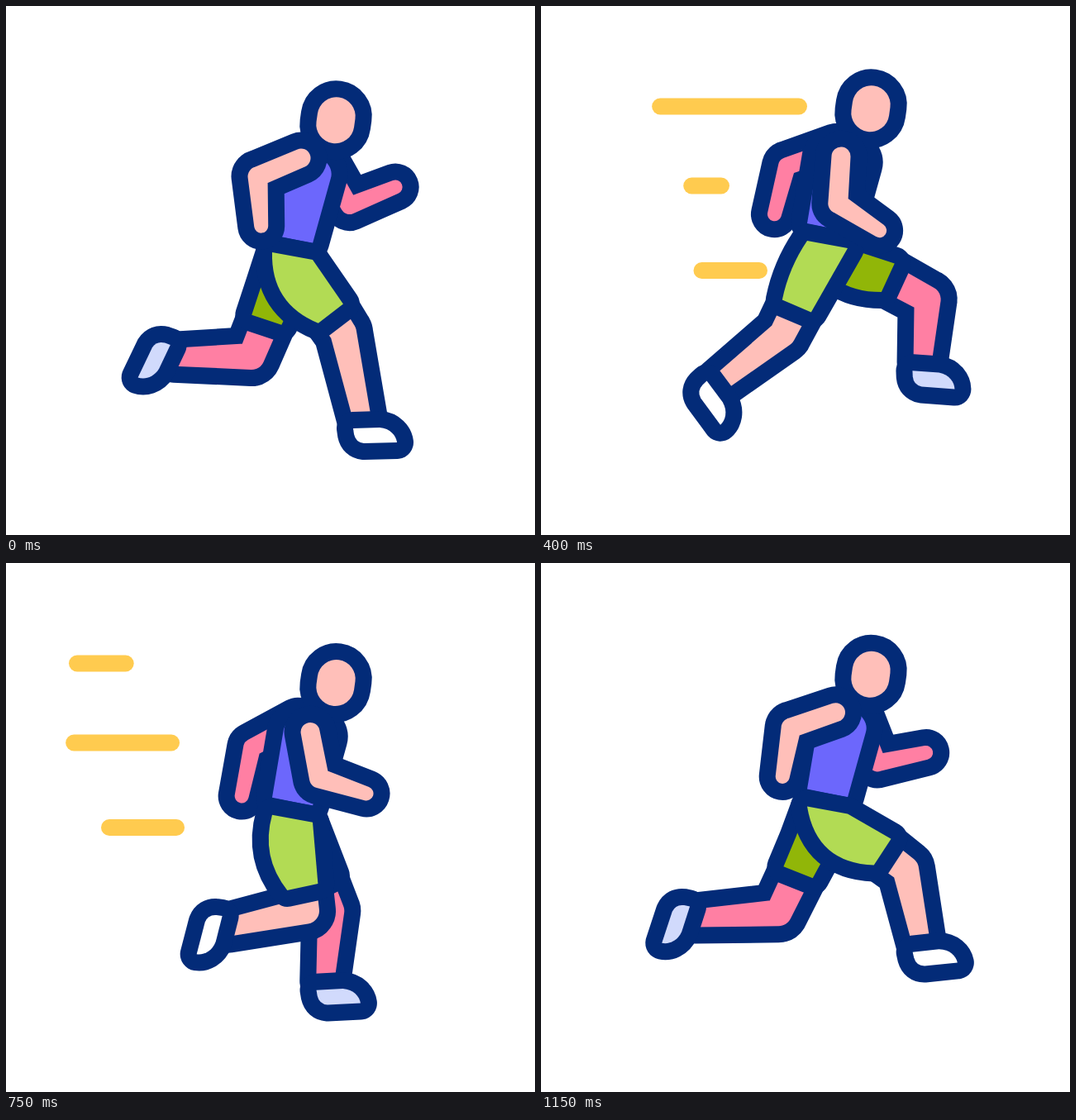
An HTML page that plays this animation: 640 px wide and 640 px high, repeating every 1.2 s.

```html
<!DOCTYPE html>
<html lang="en">
<head>
<meta charset="utf-8">
<title>Runner</title>
<style>
  html, body { margin: 0; width: 100%; height: 100%; overflow: hidden; background: #fff; }
  svg { display: block; width: 100vw; height: 100vh; }
  #body path, #body rect {
    stroke: #032b78; stroke-width: 40; stroke-linejoin: round; paint-order: stroke;
  }
  #lines line { stroke: #ffcb4f; stroke-width: 20; stroke-linecap: round; }
</style>
</head>
<body>
<svg viewBox="0 0 640 640">
  <g id="lines"></g>
  <g id="body"></g>
</svg>
<script>
const LOOP = 1200, HALF = LOOP / 2, STEP = 50;
const SKIN = '#ffbfb9', FAR_SKIN = '#ff7fa3';
const HIP = [347, 303], THIGH = 83;
const { sin, cos, atan2, PI } = Math;
const rad = deg => deg * PI / 180;

// Stride: time, knee x y, ankle x y, foot angle. The far leg runs half a loop apart.
const STRIDE = [
  [0, 408, 395, 428, 500, 0],
  [200, 383, 416, 361, 495, 0],
  [300, 311, 398, 264, 490, 16],
  [500, 287, 426, 184, 443, 95],
  [600, 297, 424, 205, 422, 117],
  [750, 363, 414, 270, 431, 106],
  [900, 444, 389, 415, 468, 29],
  [1100, 470, 358, 475, 428, -6]
];

// Arm swing: time, upper arm and forearm angle from straight down
const NEAR_SWING = [
  [0, -67, 4], [200, -28, 6], [300, -15, 36], [500, 5, 71],
  [750, 11, 72], [900, -32, 20], [1150, -71, -10]
];
const FAR_SWING = [
  [0, 30, 112], [200, -2, 46], [300, -50, 9], [500, -80, -28],
  [750, -62, -12], [900, 5, 36], [1150, 22, 102]
];

// Speed lines: delay, y, first and last cap centre
const LINES = [[0, 121.5, 312, 86], [200, 217.5, 218, 79], [100, 320, 264, 125]];

function add(parent, tag, attrs) {
  const el = document.createElementNS('http://www.w3.org/2000/svg', tag);
  for (const k in attrs) el.setAttribute(k, attrs[k]);
  return document.getElementById(parent).appendChild(el);
}
const shape = (fill, d = '') => add('body', 'path', { fill, d });
const makeLeg = (skin, shoe, shorts, seat) => ({
  shin: shape(skin),
  shoe: shape(shoe, 'M-8 11L24 10C37 11 44 20 45 28L5 29Q-5 28 -7 18Z'),
  shorts: shape(shorts),
  seat
});

const farArm = shape(FAR_SKIN);
const farLeg = makeLeg(FAR_SKIN, '#d1dafc', '#91b608', 10);
shape('#6c67fc', 'M322 277L336 194Q341 180 358 176L378 181Q397 194 393 208L371 287Z');
const nearLeg = makeLeg(SKIN, '#fff', '#b2db54', 20);
add('body', 'rect', {
  x: 376, y: 110.3, width: 46, height: 56, rx: 23, fill: SKIN, transform: 'rotate(8 399 138.3)'
});
const nearArm = shape(SKIN);
const lines = LINES.map(([, y]) => add('lines', 'line', { y1: y, y2: y }));

// Smooth periodic curve through the keys
function pose(keys, t) {
  const n = keys.length;
  const i = keys.filter(k => k[0] <= t).length - 1;
  const at = j => {
    const [time, ...rest] = keys[(j + n) % n];
    return [time + Math.floor(j / n) * LOOP, ...rest];
  };
  const [a, b, c, d] = [at(i - 1), at(i), at(i + 1), at(i + 2)];
  const span = c[0] - b[0], u = (t - b[0]) / span, v = 1 - u;
  return b.map((p, j) => {
    const m0 = (c[j] - a[j]) / (c[0] - a[0]) * span;
    const m1 = (d[j] - b[j]) / (d[0] - b[0]) * span;
    return v * v * (1 + 2 * u) * p + u * u * (3 - 2 * u) * c[j] + u * v * (v * m0 - u * m1);
  }).slice(1);
}

// Tapered capsule around two circles
function capsule([x1, y1], r1, [x2, y2], r2) {
  const a = atan2(y2 - y1, x2 - x1);
  const b = Math.acos((r1 - r2) / Math.hypot(x2 - x1, y2 - y1));
  const pt = (x, y, r, q) => `${x + r * cos(q)} ${y + r * sin(q)}`;
  return `M${pt(x1, y1, r1, a + b)}A${r1} ${r1} 0 ${+(r1 > r2)} 1 ${pt(x1, y1, r1, a - b)}` +
    `L${pt(x2, y2, r2, a - b)}A${r2} ${r2} 0 ${+(r2 > r1)} 1 ${pt(x2, y2, r2, a + b)}Z`;
}

function limb(el, [p1, p2, p3], [r1, r2, r3]) {
  el.setAttribute('d', capsule(p1, r1, p2, r2) + capsule(p2, r2, p3, r3));
}

// Point at a distance, with the angle measured forward from straight down
const reach = ([x, y], length, angle) => [x + length * sin(angle), y + length * cos(angle)];

function drawArm(el, shoulder, upper, swing, t, radii) {
  const [a, b] = pose(swing, t).map(rad);
  const elbow = reach(shoulder, upper, a);
  limb(el, [shoulder, elbow, reach(elbow, 60, b)], radii);
}

function drawLeg(leg, t) {
  const [kx, ky, ax, ay, foot] = pose(STRIDE, t);
  const thigh = atan2(kx - HIP[0], ky - HIP[1]);
  const hem = reach(HIP, THIGH, thigh), tilt = thigh + rad(4);
  const toe = rad(foot), ankle = [ax + 3 * cos(toe), ay + 3 * sin(toe)];
  limb(leg.shin, [hem, [kx, ky], ankle], [17, 16, 11]);
  leg.shoe.setAttribute('transform', `translate(${ax} ${ay}) rotate(${foot})`);

  const front = reach(hem, 19, tilt + PI / 2), back = reach(hem, 19, tilt - PI / 2);
  const bulge = leg.seat + 26 * thigh;
  const mid = [(322 + back[0]) / 2, (298 + back[1]) / 2];
  const seat = reach(mid, bulge, atan2(back[0] - 322, back[1] - 298) - PI / 2);
  leg.shorts.setAttribute('d', `M322 298L371 307L${front}L${back}Q${seat} 322 298Z`);
}

function ease(t, start, length) {
  const u = Math.min(1, Math.max(0, (t - start) / length));
  return (1 - cos(PI * u)) / 2;
}

function drawLine(el, [delay, , from, to], t) {
  const on = t > delay && t < delay + 900;
  el.setAttribute('visibility', on ? 'visible' : 'hidden');
  el.setAttribute('x1', from + (to - from) * ease(t, delay - 10, 620));
  el.setAttribute('x2', from + (to - from) * ease(t, delay + 440, 470));
}

// The body sinks evenly after the leap, then springs up
function bob(t) {
  const u = (t + 200) % HALF / 300;
  return u < 1 ? 21 * u - 14 : 7 - 21 * (u - 1) ** 2.5;
}

function draw(t) {
  const q = 2 * PI * t / LOOP;
  document.getElementById('body').setAttribute('transform', `translate(0 ${bob(t)})`);
  drawArm(farArm, [366 + 18 * cos(q), 187], 63, FAR_SWING, t, [11, 10.5, 8.5]);
  drawArm(nearArm, [361 - 10 * cos(q) + 6 * cos(2 * q), 192 - 8 * cos(q)], 57,
    NEAR_SWING, t, [11.5, 12, 8.5]);
  drawLeg(farLeg, (t + HALF) % LOOP);
  drawLeg(nearLeg, t);
  lines.forEach((el, i) => drawLine(el, LINES[i], t));
}

const start = performance.now();
function tick() {
  const t = (performance.now() - start + 0.5) % LOOP;
  draw(Math.floor(t / STEP) * STEP);
  requestAnimationFrame(tick);
}
tick();
</script>
</body>
</html>
```
